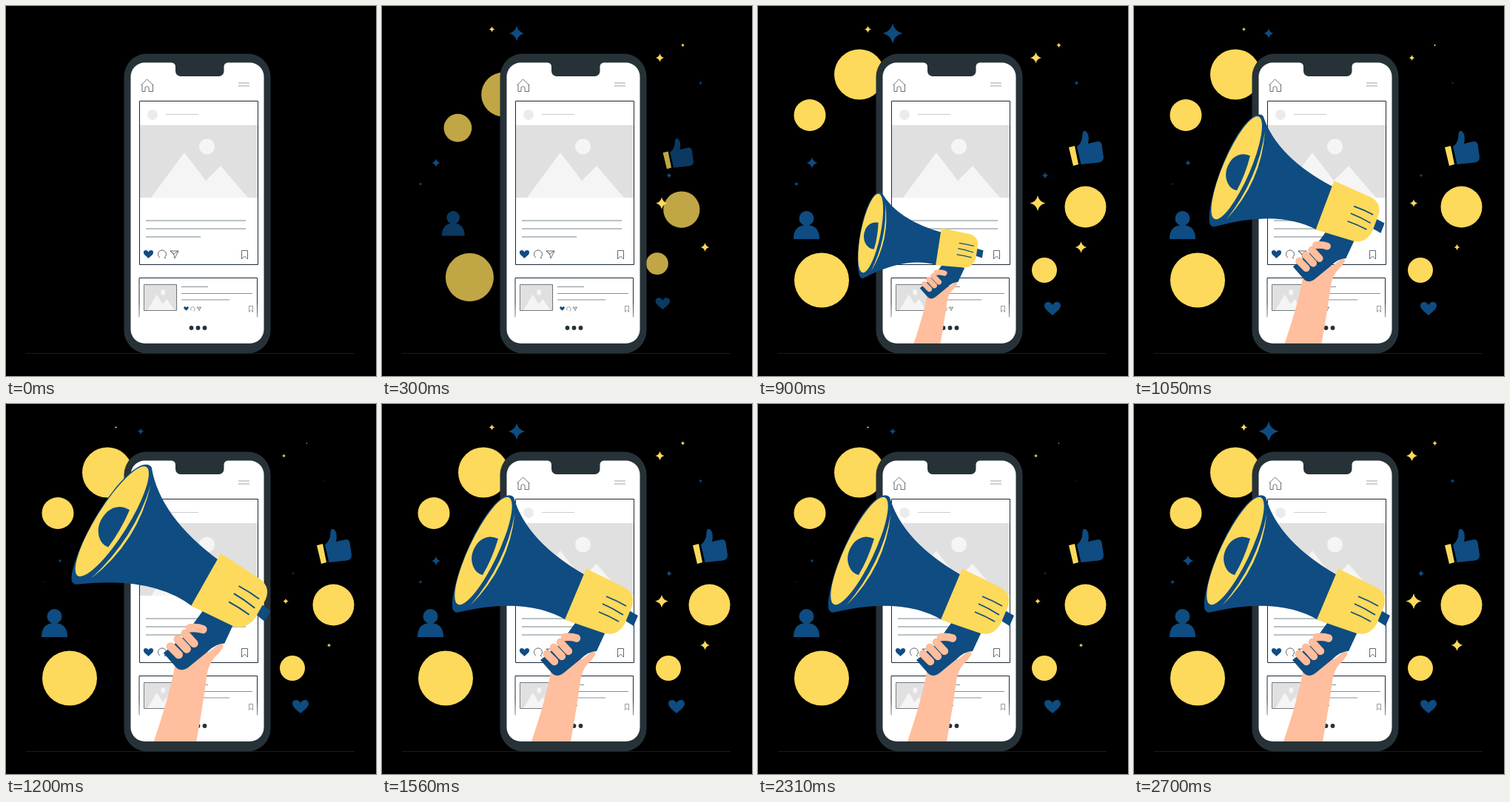
An HTML page that plays this animation: 500x500 px, repeating every 2730 ms.

```html
<!DOCTYPE html>
<html>
<head>
<meta charset="utf-8">
<style>
html, body { margin: 0; width: 100%; height: 100%; overflow: hidden; background: #000; }
svg { display: block; width: 100vw; height: 100vh; }
</style>
</head>
<body>
<svg viewBox="0 0 500 500" xmlns="http://www.w3.org/2000/svg">
  <defs>
    <clipPath id="above"><rect width="500" height="456"/></clipPath>
    <linearGradient id="side" x1="0" y1="367" x2="0" y2="421" gradientUnits="userSpaceOnUse">
      <stop offset="0" stop-color="#1c2836"/><stop offset=".6" stop-color="#1c2836"/><stop offset="1" stop-color="#8a9096"/>
    </linearGradient>
    <path id="heart" d="M0 9C-4 5-11 1-11-4C-11-10-3-11 0-5C3-11 11-10 11-4C11 1 4 5 0 9Z" fill="#0f4c81"/>
    <g id="photo">
      <path d="M181 161H340V259H181Z" fill="#e0e0e0"/>
      <circle cx="271.5" cy="190" r="10.5" fill="#f5f5f5"/>
      <path d="M196 259L241 198L270 236L290 216L327 259Z" fill="#f5f5f5"/>
    </g>
    <g id="actions" fill="none" stroke="#3a444b">
      <path d="M208 340A5.5 5.5 0 1 1 214 340L216 341M222 331H233L228 341L226.500 335ZL226.500 335L233 331"/>
    </g>
  </defs>

  <path d="M27 469.500H471" stroke="#263238" stroke-width=".6"/>
  <g id="icons"></g>
  <g id="stars"></g>

  <rect x="159.500" y="64.500" width="198" height="405" rx="31" fill="#263238"/>
  <path d="M187.500 76.500H223.500A5.500 5.500 0 0 1 229 82V88A7 7 0 0 0 236 95H287.500A7 7 0 0 0 294.500 88V82A5.500 5.500 0 0 1 300 76.500H329.500A19 19 0 0 1 348.500 95.500V437A19 19 0 0 1 329.500 456H187.500A19 19 0 0 1 168.500 437V95.500A19 19 0 0 1 187.500 76.500Z" fill="#fff"/>

  <g fill="none" stroke="#263238" stroke-width=".7">
    <path d="M182.500 107L190.500 99L199 107M184 106V115.500H188V110Q190.500 107 193 110V115.500H198.500V106"/>
    <path d="M314 104H329M314 108H329" stroke="#737b80"/>
    <path d="M216 146.500H260" stroke="#b4b8ba"/>
  </g>
  <circle cx="198" cy="147" r="7" fill="#ebebeb"/>
  <use href="#photo"/>
  <path d="M180.500 128.500H340.500V349.500H180.500Z" fill="none" stroke="#1c2836"/>
  <path d="M189 290H324M189 301H324M189 312H263" stroke="#66767d" stroke-width=".9"/>
  <use href="#heart" transform="translate(192.500 335.500) scale(.6)"/>
  <use href="#actions" stroke-width=".8"/>
  <path d="M318.500 330.500H326.500V342L322.500 338L318.500 342Z" fill="none" stroke="#3a444b" stroke-width=".8"/>

  <path d="M180 420.500V367.500H339.500V420.500" fill="none" stroke="url(#side)"/>
  <use href="#photo" transform="translate(137 320.500) scale(.277 .35)"/>
  <path d="M186.500 376.500H230.500V411.500H186.500Z" fill="none" stroke="#3a444b" stroke-width=".7"/>
  <path d="M237 379.500H273M237 388.500H333M237 397H302" stroke="#66767d" stroke-width=".8"/>
  <use href="#heart" transform="translate(243.500 409) scale(.3)"/>
  <use href="#actions" transform="translate(147 241.500) scale(.5)" stroke-width="1"/>
  <path d="M328.500 405.500H333.500V413.500L331 411L328.500 413.500Z" fill="none" stroke="#555e64" stroke-width=".6"/>
  <g fill="#263238"><circle cx="250.500" cy="435" r="2.900"/><circle cx="259.500" cy="435" r="2.900"/><circle cx="268.500" cy="435" r="2.900"/></g>

  <g clip-path="url(#above)">
    <g id="caller">
      <path d="M202 456Q223 394 228 362L250 340L270 345L283 335Q288 333 288.500 338Q285 345 278 351Q270 360 268 374Q264 405 255 456Z" fill="#ffbe9d"/>
      <path d="M264 292L303 306L290 334Q279 334 268 345L246 363Q236 371 229 363L214 346L240 325Z" fill="#0f4c81"/>
      <g id="horn">
        <path d="M334 279L346 286L340 300L329 293Z" fill="#0f4c81"/>
        <path d="M165 125Q174 121 178 126Q195 186 276 232L249 292Q195 260 105 281Q95 284 95 273C95 236 132 144 165 125Z" fill="#0f4c81"/>
        <ellipse cx="137" cy="198.500" rx="19.500" ry="80" transform="rotate(25.500 137 198.500)" fill="#fdda5b"/>
        <path d="M157 182Q142 175 130 187Q117 203 123 219Q127 229 136 231Q149 209 157 182Z" fill="#0f4c81"/>
        <path d="M179.500 148Q167 216 119.500 272Q172 220 179.500 148Z" fill="#fdda5b"/>
        <path d="M276 222.500L328 248Q343 257 338 273L328 297Q318 314 301 310L247 291.500Z" fill="#fdda5b"/>
        <path d="M303 260Q317 265.500 330 273M298 270Q312 276 326 285M293 281Q307 286.500 320 294" fill="none" stroke="#0f4c81" stroke-width="1.800"/>
      </g>
      <g id="fingers" fill="none" stroke-linecap="round">
        <path d="M247 315Q256 314 263 316.500" stroke="#ffbe9d" stroke-width="10.500"/>
      </g>
    </g>
  </g>
</svg>
<script>
const LOOP = 2730, STEP = 30;
const YELLOW = '#fdda5b', BLUE = '#0f4c81', SKIN = '#ffbe9d';
const $ = id => document.getElementById(id);

function add(parent, tag, attrs) {
  const el = document.createElementNS('http://www.w3.org/2000/svg', tag);
  for (const k in attrs) el.setAttribute(k, attrs[k]);
  parent.appendChild(el);
  return el;
}

const disc = r => `<circle r="${r}" fill="${YELLOW}"/>`;
const thumb = `<path d="M-23.500-1L-15.500-3L-10.500 22L-17.500 24Z" fill="${YELLOW}"/>
  <path d="M-12.500-2Q-5-7-5-19Q-4-25 0-22.500Q5-17 2.500-6L16-9Q20-9 21-5L23.500 12Q24 18 17 19.500L-7 22Z" fill="${BLUE}"/>`;
const person = `<g fill="${BLUE}"><circle cy="-9" r="10"/><path d="M-17.500 19Q-17.500 0 0 0Q17.500 0 17.500 19Z"/></g>`;

// resting place, offset to the hiding place behind the phone, artwork
const icons = [
  [137, 92.5, 113, 113, disc(34)],
  [70, 147.5, 135, 72, disc(21.5)],
  [86, 370.5, 135, -16, disc(37)],
  [442.5, 271.5, -157, 15, disc(28)],
  [387, 357, -63, -37, disc(17)],
  [443.5, 192, -180, 30, thumb],
  [65.5, 296, 128, -9, person],
  [398, 409, -78, -28, '<use href="#heart"/>']
].map(([x, y, dx, dy, art]) => {
  const el = add($('icons'), 'g', {});
  el.innerHTML = art;
  return { x, y, dx, dy, el };
});

// place, radius, colour
const stars = [
  [182, 37, 13.5, BLUE], [73, 212, 7.5, BLUE], [52, 240.5, 3, BLUE],
  [430.5, 104, 3, BLUE], [388, 229, 4.5, BLUE],
  [148.5, 31.5, 4.8, YELLOW], [375.5, 70, 7.5, YELLOW], [406.5, 53, 3.2, YELLOW],
  [378, 266.5, 10.5, YELLOW], [436.5, 326, 7.8, YELLOW]
].map(([x, y, r, fill]) => ({ x, y, r, el: add($('stars'), 'path', { fill }) }));

for (const d of ['M241 322L252 334', 'M232 329L243 341', 'M223 338L233 348']) {
  add($('fingers'), 'path', { d, stroke: '#eda587', 'stroke-width': 10.4 });
  add($('fingers'), 'path', { d, stroke: SKIN, 'stroke-width': 9.8 });
}

// time, scale of arm and horn, turn of the horn on its handle
const keys = [
  [540, 0, -24],
  [900, 0.68, -14],
  [1200, 1.086, 6.7],
  [1500, 1, 0]
];

function slope(i, k) {
  if (i === 0 || i === keys.length - 1) return 0;
  const d = j => (keys[j + 1][k] - keys[j][k]) / (keys[j + 1][0] - keys[j][0]);
  const a = d(i - 1), b = d(i);
  return a * b <= 0 ? 0 : 2 * a * b / (a + b);
}

function keyed(t, k) {
  const last = keys.length - 1;
  if (t <= keys[0][0]) return keys[0][k];
  if (t >= keys[last][0]) return keys[last][k];
  let i = 0;
  while (t > keys[i + 1][0]) i++;
  const h = keys[i + 1][0] - keys[i][0], u = (t - keys[i][0]) / h, v = 1 - u;
  return keys[i][k] * (1 + 2 * u) * v * v + keys[i + 1][k] * u * u * (3 - 2 * u)
    + h * (slope(i, k) * u * v * v - slope(i + 1, k) * u * u * v);
}

function drawStar({ x, y, r, el }, size) {
  const a = r * size, b = a * 0.18;
  el.setAttribute('d', `M${x} ${y - a}Q${x + b} ${y - b} ${x + a} ${y}Q${x + b} ${y + b} ${x} ${y + a}`
    + `Q${x - b} ${y + b} ${x - a} ${y}Q${x - b} ${y - b} ${x} ${y - a}Z`);
}

function draw(t) {
  const left = Math.pow(1 - Math.min(t / 1000, 1), 4), e = 1 - left;
  for (const { x, y, dx, dy, el } of icons) {
    el.setAttribute('transform', `translate(${x + dx * left} ${y + dy * left}) scale(${0.5 + 0.5 * e})`);
    el.setAttribute('opacity', e);
  }
  const pulse = 0.665 + 0.37 * Math.cos((t - 255) / 600 * 2 * Math.PI);
  for (const star of stars) drawStar(star, pulse * e);

  const s = keyed(t, 1);
  $('caller').style.display = s > 0.01 ? '' : 'none';
  $('caller').setAttribute('transform', `translate(228.5 456) scale(${Math.max(s, 0.01)}) translate(-228.5 -456)`);
  $('horn').setAttribute('transform', `rotate(${keyed(t, 2)} 283 302)`);
}

const start = performance.now();
function tick() {
  const t = (performance.now() - start) % LOOP;
  draw(Math.floor(t / STEP) * STEP);
  requestAnimationFrame(tick);
}
tick();
</script>
</body>
</html>
```
